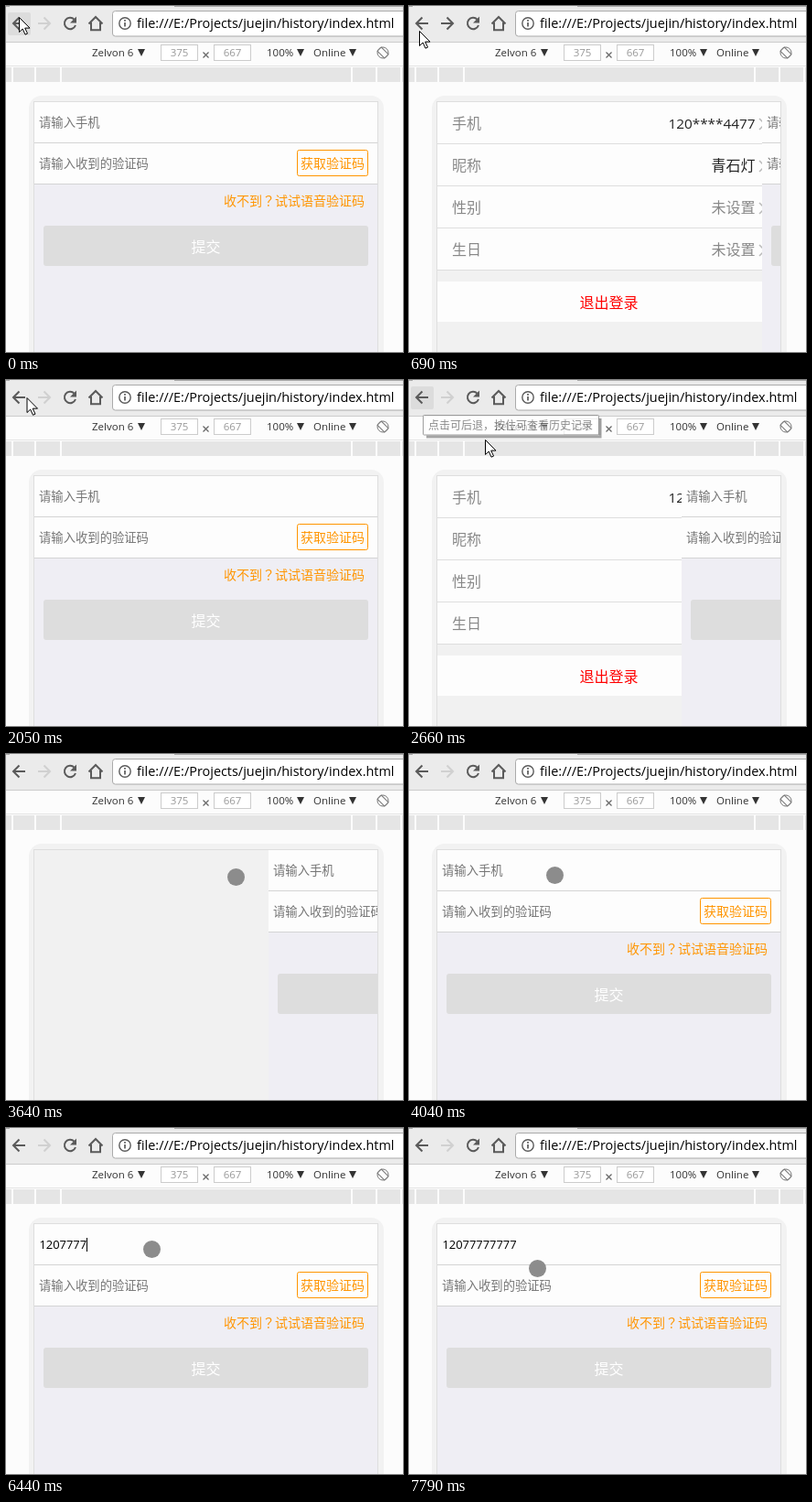
Animation, 434 px wide and 378 px high, one loop 8000 ms. Source, as an HTML page:

```html
<!DOCTYPE html>
<html lang="zh-CN">
<head>
<meta charset="utf-8">
<title>History navigation</title>
<style>
  html, body { margin: 0; width: 100%; height: 100%; overflow: hidden; background: #fcfcfc; }
  svg { display: block; width: 434px; height: 378px; }
  text { font-family: "Open Sans", "Noto Sans CJK SC", "Noto Sans CJK", sans-serif; white-space: pre; }
  .zh { font-family: "Noto Sans CJK SC", "Noto Sans CJK", sans-serif; }
  .centered { font-family: "Noto Sans CJK TC", "Noto Sans CJK", sans-serif; }
  .tool { font-size: 11.5px; fill: #333; }
  .size { fill: #999; text-anchor: middle; }
  .box { fill: #fff; stroke: #ccc; }
  .icon { fill: none; stroke: #5a5a5a; stroke-width: 2; }
  .field { font-size: 13.33px; fill: #757575; }
  .orange { font-size: 14px; fill: #ff9500; }
  .big { font-size: 16px; }
  .label { fill: #888; }
  .end { text-anchor: end; }
  .mid { text-anchor: middle; }
</style>
</head>
<body>
<svg viewBox="0 0 434 378">
  <defs>
    <clipPath id="screen"><rect x="31" y="105" width="375" height="273"/></clipPath>
    <path id="drop" d="M0 0h8l-4 8z" fill="#333"/>
  </defs>

  <rect width="434" height="378" fill="#fcfcfc"/>

  <!-- browser bar -->
  <rect width="434" height="39" fill="#ebebeb"/>
  <path d="M184 .5H434M0 .5H4" stroke="#aaa"/>
  <path d="M0 39.5H434" stroke="#ccc"/>
  <rect id="hover" x="2" y="7" width="25" height="25" rx="2" fill="#dcdcdc"/>
  <path class="icon" d="M21 19H8.5M14.5 12.5L8 19l6.5 6.5"/>
  <path class="icon" id="forward" d="M35 19H47.5M41.5 12.5L48 19l-6.5 6.5"/>
  <path class="icon" d="M74.6 14.6A6.2 6.2 0 1 0 76 21"/>
  <path d="M77 11.5v7h-7z" fill="#5a5a5a"/>
  <path class="icon" d="M90.5 19.5L98 12l7.5 7.5M93 18v8.2h10V18"/>
  <rect x="116.5" y="5.5" width="330" height="27.5" rx="3" fill="#fff" stroke="#aaa"/>
  <circle cx="130" cy="19" r="6.2" fill="none" stroke="#5a5a5a" stroke-width="1.4"/>
  <path d="M130 18v4.5M130 15v1.8" stroke="#5a5a5a" stroke-width="1.7"/>
  <text x="143" y="24" font-size="14.45" fill="#000">file:///E:/Projects/juejin/history/index.html</text>

  <!-- device toolbar -->
  <g class="tool">
    <text x="94" y="55">Zelvon 6</text>
    <text x="285" y="55">100%</text>
    <text x="336" y="55">Online</text>
    <use href="#drop" x="144" y="47"/>
    <use href="#drop" x="318" y="47"/>
    <use href="#drop" x="375" y="47"/>
    <rect class="box" x="169.5" y="42.5" width="40" height="17"/>
    <rect class="box" x="227.5" y="42.5" width="40" height="17"/>
    <text class="size" x="189.5" y="55">375</text>
    <text class="size" x="247.5" y="55">667</text>
    <path d="M215.5 50.5l6 6m0-6l-6 6" stroke="#666" stroke-width="1.2"/>
    <g fill="none" stroke="#777">
      <circle cx="412" cy="51" r="6"/>
      <rect x="409" y="45.5" width="6" height="11" fill="#fcfcfc" transform="rotate(-45 412 51)"/>
    </g>
  </g>
  <path d="M0 65.5H434" stroke="#e4e4e4"/>
  <path d="M0 75H6M8 75H31M33 75H59M61 75H377M379 75H404M406 75H431M433 75H434" stroke="#e5e5e5" stroke-width="16"/>

  <!-- device -->
  <rect x="25" y="98" width="388" height="300" rx="14" fill="#f2f2f2"/>
  <rect x="30.5" y="104.5" width="376" height="300" fill="#f1f1f1" stroke="#dedede"/>

  <g clip-path="url(#screen)">
    <g id="profile" class="zh big">
      <rect x="31" y="105" width="376" height="184" fill="#fdfdfd"/>
      <g id="rows"></g>
      <rect x="31" y="301" width="376" height="44" fill="#fdfdfd"/>
      <text class="zh mid" x="218.5" y="329.5" fill="#f00">退出登录</text>
    </g>

    <g id="form">
      <rect x="31" y="105" width="376" height="273" fill="#efeef4"/>
      <rect x="31" y="105" width="376" height="89" fill="#fdfdfd"/>
      <path d="M31 149.5H407M31 194.5H407" stroke="#d4d4d4"/>
      <text class="zh field" id="hint" x="36" y="132">请输入手机</text>
      <text id="typed" x="36.5" y="132" font-size="12.9" fill="#000"></text>
      <rect id="caret" y="120" width="1" height="15" fill="#000"/>
      <text class="zh field" x="36" y="177">请输入收到的验证码</text>
      <rect x="318.5" y="157.5" width="77" height="28" rx="2" fill="none" stroke="#ff9500"/>
      <text class="zh orange" x="322" y="177">获取验证码</text>
      <text class="zh orange" x="238" y="218">收不到<tspan class="centered" lang="zh-TW">？</tspan>试试语音验证码</text>
      <rect x="41" y="240" width="355" height="44" rx="3" fill="#ddd"/>
      <text class="zh big mid" x="218.5" y="268.5" fill="#fff">提交</text>
    </g>
  </g>

  <g id="tip">
    <path id="tipShadow" d="M194 4v20H4" fill="none" stroke="#888" stroke-width="3"/>
    <g id="tipBody">
      <rect x=".5" y=".5" width="192" height="21.5" rx="1" fill="#fff" stroke="#767676"/>
      <text class="zh" id="tipText" x="6" y="15.5" font-size="12" fill="#575757"></text>
    </g>
  </g>

  <path id="arrow" d="M.5 .5V16.5l3.7-3.5 2.8 6.2 2.5-1.1-2.8-6H12z" fill="#fff" stroke="#000"/>
  <circle id="touch" r="9.5" fill="#8c8c8c"/>
</svg>

<script>
const $ = id => document.getElementById(id);
const LOOP = 8000, WIDTH = 376;

const ticks = [0, 150, 280, 410, 540, 690, 810, 930, 1230, 1380, 1510, 1660, 1780, 2050, 2200,
  2510, 2660, 2780, 2930, 3080, 3210, 3360, 3640, 3770, 3910, 4040, 4310, 4740, 5010, 5260, 5410,
  5560, 5860, 6010, 6290, 6510, 6720, 6940, 7210, 7640, 7790];
const keyTimes = [5010, 5260, 5410, 5560, 5860, 6010, 6290, 6510, 6720, 6940, 7210];
const phone = "12077777777", digitWidth = 7.38;

const pointer = [[0, 14, 12], [410, 14, 12], [690, 11, 27], [930, 36, 21], [1780, 36, 21],
  [2200, 15, 18], [2510, 15, 18], [2660, 83, 65], [2930, 170, 125], [3210, 251, 134],
  [3770, 251, 134], [4040, 159, 132], [7640, 159, 132], [7790, 140, 153], [LOOP, 140, 153]];

const slides = [
  { start: 408, from: 0, to: WIDTH }, { start: 1291, from: WIDTH, to: 0 },
  { start: 2492, from: 0, to: WIDTH }, { start: 3556, from: WIDTH, to: 0 }];

const tips = [
  { start: 1230, fade: [1, .7, .35], x: 36, y: 41, text: "点击可前进，按住可查看历史记录" },
  { start: 2510, fade: [1, .68, .35], x: 15, y: 38, text: "点击可后退，按住可查看历史记录" }];

[["手机", "120****4477", "#222"], ["昵称", "青石灯", "#222"],
 ["性别", "未设置", "#888"], ["生日", "未设置", "#888"]].forEach(([label, value, color], i) => {
  const y = 105 + 46 * i, size = i ? 16 : 15.3;
  $("rows").innerHTML += `<path d="M31 ${y + 45.5}H407" stroke="#dedede"/>
    <text class="zh label" x="47" y="${y + 29}">${label}</text>
    <text class="end" x="378.5" y="${y + 28.5}" font-size="${size}" fill="${color}">${value}</text>
    <path d="M383 ${y + 18}l6 6-6 6" fill="none" stroke="#bbb" stroke-width="1.5"/>`;
});

const within = (t, a, b) => t >= a && t < b;
const show = (id, on) => $(id).setAttribute("visibility", on ? "visible" : "hidden");
const place = (id, x, y) => $(id).setAttribute("transform", `translate(${x} ${y})`);

// CSS "ease": cubic-bezier(.25, .1, .25, 1)
function ease(p) {
  if (p <= 0 || p >= 1) return p <= 0 ? 0 : 1;
  const curve = (u, a, b) => 3 * u * (1 - u) ** 2 * a + 3 * u * u * (1 - u) * b + u ** 3;
  let lo = 0, hi = 1;
  for (let i = 0; i < 24; i++) {
    const u = (lo + hi) / 2;
    if (curve(u, .25, .25) < p) lo = u; else hi = u;
  }
  return curve(lo, .1, 1);
}

function formOffset(t) {
  const slide = slides.findLast(s => s.start <= t);
  return slide ? Math.round(slide.from + (slide.to - slide.from) * ease((t - slide.start) / 400)) : 0;
}

function pointerAt(t) {
  const i = pointer.findIndex(p => p[0] > t);
  const [t0, x0, y0] = pointer[i - 1], [t1, x1, y1] = pointer[i];
  const k = (t - t0) / (t1 - t0);
  return [x0 + (x1 - x0) * k, y0 + (y1 - y0) * k];
}

function drawTip(t) {
  const tip = tips.find(p => within(t, p.start, p.start + 400));
  show("tip", tip);
  if (!tip) return;
  const step = Math.min(2, Math.floor((t - tip.start) / 135));
  place("tip", tip.x, tip.y);
  $("tipText").textContent = tip.text;
  $("tipBody").setAttribute("opacity", tip.fade[step]);
  $("tipShadow").setAttribute("opacity", .9 - .15 * step);
}

function draw(t) {
  const [leave, enter, leaveAgain, enterAgain] = slides.map(s => s.start);
  place("form", formOffset(t), 0);
  show("profile", within(t, leave, enter) || within(t, leaveAgain, enterAgain));
  show("hover", t < 600 || within(t, 2500, 2700));
  const canGoForward = within(t, 600, 1300) || within(t, 2700, 3600);
  $("forward").style.stroke = canGoForward ? "#5a5a5a" : "#d0d0d0";

  const count = keyTimes.filter(k => k <= t).length;
  $("typed").textContent = phone.slice(0, count);
  show("hint", !count);
  show("caret", within(t, 4310, 4740) || within(t, 5010, 7640));
  $("caret").setAttribute("x", Math.round(36.4 + count * digitWidth));

  const [x, y] = pointerAt(t), touching = y > 100;
  place("arrow", x, y);
  place("touch", x + .5, y + .5);
  show("arrow", !touching);
  show("touch", touching);
  drawTip(t);
}

const begin = performance.now();
function frame() {
  const now = (performance.now() - begin) % LOOP;
  draw(ticks.findLast(t => t <= now));
  requestAnimationFrame(frame);
}
frame();
</script>
</body>
</html>
```
